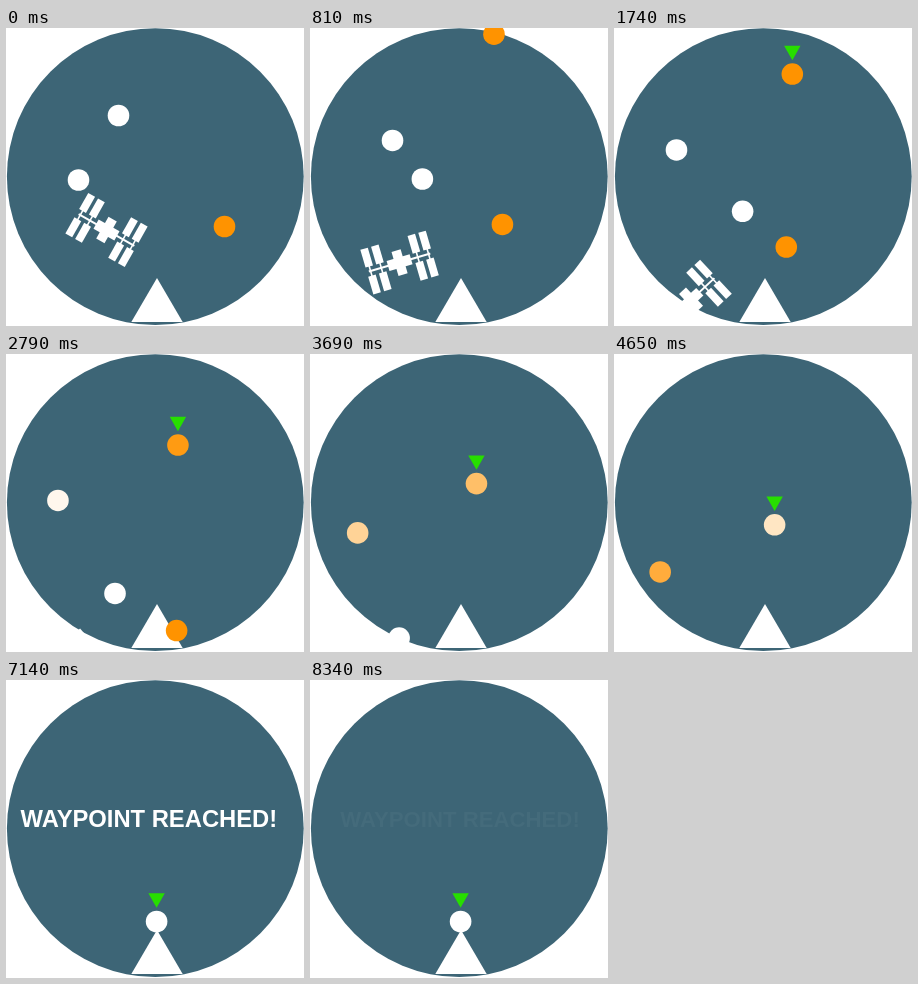
Recreate the animation shown at these times as an HTML page with a canvas. Size 298x298 px, loop 9060 ms.

```html
<!DOCTYPE html>
<html lang="en">
<head>
<meta charset="utf-8">
<title>Waypoint</title>
<style>
html, body { margin: 0; height: 100%; overflow: hidden; background: #fff; }
canvas { display: block; }
</style>
</head>
<body>
<canvas id="stage" width="298" height="298"></canvas>
<script>
const ctx = document.getElementById('stage').getContext('2d');
const LOOP = 9060, STEP = 30, ARRIVAL = 6300;

const clamp = (v, max = 1) => Math.min(max, Math.max(0, v));
const mix = (a, b, k) => a + (b - a) * k;
// From orange (0) to white (1)
const tint = k => `rgb(255, ${Math.round(mix(147, 255, k))}, ${Math.round(255 * k)})`;

// Point on a Bezier curve of any degree
function bezier(points, u) {
  while (points.length > 1) {
    points = points.slice(1).map(([x, y], i) => [mix(points[i][0], x, u), mix(points[i][1], y, u)]);
  }
  return points[0];
}

// Each drifting dot follows one curve until it has left the stage
const drifters = [
  { life: 5880, turnsOrange: true,
    curve: [[112.5, 87.5], [59.3, 159.7], [42, 41.1], [60, 241.7], [28.9, 164.9], [59.7, 305.8]] },
  { life: 4185, white: 1,
    curve: [[72.5, 152], [133.1, 127.3], [179, 192.7], [58.4, 274.8], [95.5, 300.5]] },
  { life: 3300, white: 0,
    curve: [[218.5, 198.5], [180, 182], [149.8, 221.4], [180.8, 316.7]] },
];

function dot(x, y, color, r = 10.8) {
  ctx.fillStyle = color;
  ctx.beginPath();
  ctx.arc(x, y, r, 0, 7);
  ctx.fill();
}

function triangle(x, tip, halfWidth, base, color) {
  ctx.fillStyle = color;
  ctx.beginPath();
  ctx.moveTo(x, tip);
  ctx.lineTo(x - halfWidth, base);
  ctx.lineTo(x + halfWidth, base);
  ctx.fill();
}

// Drifts steadily while its spin slows down
function drawStation(seconds) {
  if (seconds > 3) return;
  const bar = (w, h, x = 0, y = 0) => ctx.fillRect(x - w / 2, y - h / 2, w, h);
  ctx.save();
  ctx.translate(100.5 - 13.5 * seconds, 202 + 40.2 * seconds);
  ctx.rotate((29.5 - 69.5 * seconds + 16 * seconds ** 2) * Math.PI / 180);
  ctx.fillStyle = '#fff';
  bar(64, 2);
  bar(24, 10.5);
  bar(9.5, 25);
  for (const side of [-1, 1]) {
    for (const x of [19 * side, 30.2 * side]) {
      bar(1.6, 12, x);
      bar(7.8, 18.5, x, -14);
      bar(7.8, 18.5, x, 14);
    }
  }
  ctx.restore();
}

function drawMessage(t) {
  if (t < 6660) return;
  const p = clamp((t - 6630) / 900), rest = (1 - p) ** 3, scale = 1 + 0.875 * rest;
  const fadeSteps = clamp(Math.floor((t - 7740) / 60), 10);
  ctx.save();
  ctx.translate(150 - 88 * rest, 139);
  ctx.scale(scale, scale);
  ctx.globalAlpha = clamp(p * 2) * (1 - 0.096 * fadeSteps);
  ctx.fillStyle = '#fff';
  ctx.font = 'bold 22.2px "Liberation Sans", Arial, sans-serif';
  ctx.textAlign = 'center';
  ctx.fillText('WAYPOINT REACHED!', 0, 7.8);
  ctx.restore();
}

function draw(now) {
  const t = Math.floor((now % LOOP) / STEP) * STEP;
  const swap = clamp((t - 2600) / 2680);
  const left = Math.max(0, ARRIVAL - t);
  const goalX = 150.6 + 0.00608 * left, goalY = 241.5 - 0.04287 * left;

  ctx.clearRect(0, 0, 298, 298);
  dot(149.3, 148.6, '#3d6576', 148.4);
  triangle(151, 250, 25.7, 294, '#fff');
  drawStation(t / 1000);
  for (const { life, curve, white, turnsOrange } of drifters) {
    if (t < life) dot(...bezier(curve, t / life), tint(turnsOrange ? 1 - swap : white));
  }
  dot(goalX, goalY, tint(swap));
  triangle(goalX, goalY - 13.8, 8.2, goalY - 28.2, '#27de00');
  drawMessage(t);
}

const start = performance.now();
function tick() {
  draw(performance.now() - start);
  requestAnimationFrame(tick);
}
tick();
</script>
</body>
</html>
```
